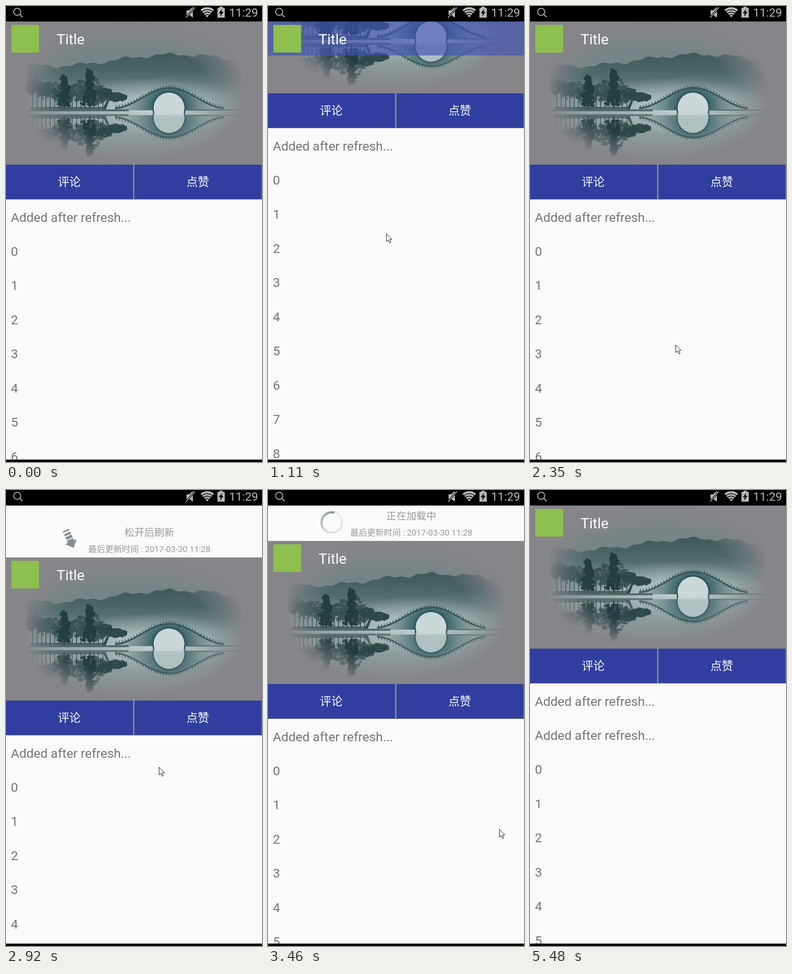
An HTML page with a canvas for the animation above (5.63 s loop, 526 px wide and 940 px high).

```html
<!DOCTYPE html>
<html lang="zh">
<head>
<meta charset="utf-8">
<style>
html, body { margin: 0; width: 526px; height: 940px; overflow: hidden; background: #000; }
canvas { display: block; }
</style>
</head>
<body>
<canvas id="stage" width="526" height="940"></canvas>
<script>
const W = 526, H = 940, LOOP = 5630, BAR = 32, HEADER = 73, PIN = 224;
const GREY = '#868589', PAPER = '#fafafa', INDIGO = '#303f9f', WATERLINE = 220;
const RELEASE = 3200, LOADING = 3400, DONE = 4960;
const FONT = 'Roboto, "Noto Sans CJK SC", "Noto Sans CJK", sans-serif';
const g = document.getElementById('stage').getContext('2d');

const ramp = (t, a, b) => Math.min(1, Math.max(0, (t - a) / (b - a)));
const ease = (t, a, b) => { const u = ramp(t, a, b); return u * u * (3 - 2 * u); };
const easeOut = (t, a, b) => 1 - (1 - ramp(t, a, b)) ** 2;

// Swipe up and back down, then pull to refresh, settle while loading, and close.
const scrollAt = t => 276 * (ease(t, 622, 1560) - ease(t, 1600, 2320));
const dragAt = t => 182 * ramp(t, 2640, 3120);
const pullAt = t => dragAt(t) - (182 - HEADER) * ease(t, RELEASE, 3440) - HEADER * easeOut(t, DONE, 5470);

function pointerAt(t) {
  const drift = ramp(t, 880, 2330), drag = dragAt(t);
  return [
    243 + 56 * drift ** 3 + drag / 7 + 203 * easeOut(t, 3215, 3720),
    614 + 70 * (1 - ease(t, 320, 620)) - scrollAt(t) + 84 * drift ** 2 - 308 * ease(t, 2450, 2640) + 1.7 * drag
  ];
}

function seeded(seed) {
  return () => (seed = (seed * 16807) % 2147483647) / 2147483647;
}

function box(c, color, x, y, w, h) {
  c.fillStyle = color;
  c.fillRect(x, y, w, h);
}

function poly(c, color, pts) {
  c.beginPath();
  pts.forEach(([x, y]) => c.lineTo(x, y));
  c.closePath();
  c.fillStyle = color;
  c.fill();
}

function spread(grad, stops) {
  stops.forEach((s, i) => grad.addColorStop(i / (stops.length - 1), s));
  return grad;
}
const fade = (c, y0, y1, ...stops) => spread(c.createLinearGradient(0, y0, 0, y1), stops);
const glow = (c, x, y, r0, r1, ...stops) => spread(c.createRadialGradient(x, y, r0, x, y, r1), stops);

function text(str, x, y, size, color, align = 'left', weight = 400) {
  g.font = `${weight} ${size}px ${FONT}`;
  g.fillStyle = color;
  g.textAlign = align;
  g.fillText(str, x, y);
}

// Fills the area under the curve y = f(x).
function under(c, color, f, x0, x1, bottom) {
  const pts = [[x0, bottom]];
  for (let x = x0; x <= x1; x += 3) pts.push([x, f(x)]);
  poly(c, color, [...pts, [x1, bottom]]);
}

function foliage(c, rnd, color, x, y, rx, ry, count) {
  c.fillStyle = color;
  for (let i = 0; i < count; i++) {
    const a = rnd() * 7, r = Math.sqrt(rnd());
    c.beginPath();
    c.ellipse(x + Math.cos(a) * r * rx, y + Math.sin(a) * r * ry, 2 + rnd() * 4, 1.5 + rnd() * 2.5, 0, 0, 7);
    c.fill();
  }
}

function conifer(c, rnd, x, top) {
  for (let y = top; y < 205; y += 3) {
    const w = 2 + (y - top) * 0.17 + rnd() * 5;
    foliage(c, rnd, '#243f41', x, y, w, 3, 5);
  }
  box(c, '#243f41', x - 1.5, top, 3, 213 - top);
}

function bridge(c) {
  const deck = x => 167 + 21 * (1 - Math.cos((x - 335) / 115 * Math.PI));
  under(c, glow(c, 335, 210, 32, 115, '#396168', '#6f8a8a', '#8ea4a3', '#7c9292'), deck, 224, 448, 215);
  for (let x = 224; x < 448; x += 2) box(c, '#35565a', x, deck(x), 2, 3.5);
  for (let x = 226; x < 448; x += 6) box(c, '#46666a', x, deck(x) - 4, 2, 5);
  c.beginPath();
  c.arc(335, 210, 33, Math.PI * 0.9, Math.PI * 2.1);
  c.fillStyle = '#cbd8d7';
  c.fill();
  c.strokeStyle = '#2f555c';
  c.lineWidth = 3;
  c.stroke();
}

// Everything standing on the shore; drawn again upside down as the reflection.
function shore(c) {
  const rnd = seeded(41);
  bridge(c);
  for (let x = 54; x < 200; x += 9) {
    const top = 150 + rnd() * 24;
    foliage(c, rnd, 'rgba(56,82,83,.7)', x, top + 14, 10, 18, 32);
    box(c, '#33504f', x, top + 12, 1.8, 200 - top);
  }
  conifer(c, rnd, 120, 146);
  conifer(c, rnd, 172, 134);
  foliage(c, rnd, '#2d494a', 202, 180, 16, 9, 55);
  foliage(c, rnd, '#2d494a', 226, 187, 20, 9, 65);
  poly(c, '#2d494a', [[198, 213], [210, 190], [214, 190], [205, 213]]);
  box(c, 'rgba(60,86,87,.85)', 50, 208, 150, 7);
  box(c, '#506a6a', 44, 213, 208, 4);
  box(c, 'rgba(90,112,112,.8)', 370, 213, 113, 3);
}

function makePhoto() {
  const cv = document.createElement('canvas');
  cv.width = W;
  cv.height = 330;
  const c = cv.getContext('2d');
  const farRidge = x => 112 + 12 * Math.cos((x - 90) / 260 * Math.PI) + 3 * Math.sin(x / 14) + 1.5 * Math.sin(x / 5);
  const nearRidge = x => 150 + 17 * Math.cos((x - 210) / 190 * Math.PI) + 2.5 * Math.sin(x / 11);

  box(c, fade(c, 32, WATERLINE, '#838789', '#768485', '#718787', '#93a8a7'), 0, 0, W, WATERLINE);
  under(c, fade(c, 95, 200, '#3d5859', '#516d6d', 'rgba(125,150,149,0)'), farRidge, 41, 485, 200);
  under(c, fade(c, 130, 190, '#456162', 'rgba(130,152,151,0)'), nearRidge, 205, 485, 190);
  box(c, fade(c, WATERLINE, 320, '#93a5a4', '#8c9a9a', '#868a8c'), 0, WATERLINE - 4, W, 120);
  c.save();
  c.translate(300, 208);
  c.scale(1, 0.32);
  box(c, glow(c, 0, 0, 0, 190, 'rgba(214,227,225,.85)', 'rgba(190,206,204,.45)', 'rgba(180,198,196,0)'), -300, -300, 600, 600);
  c.restore();

  shore(c);
  c.save();
  c.globalAlpha = 0.78;
  c.translate(0, 2 * WATERLINE);
  c.scale(1, -1);
  shore(c);
  c.restore();

  c.globalCompositeOperation = 'destination-in';
  c.save();
  c.translate(262, 180);
  c.scale(236, 150);
  box(c, glow(c, 0, 0, 0.66, 1, '#000', 'rgba(0,0,0,.55)', 'rgba(0,0,0,0)'), -2, -2, 4, 4);
  c.restore();
  c.clearRect(0, 0, 41, 330);
  c.clearRect(483, 0, 43, 330);
  return cv;
}
const photo = makePhoto();

function statusBar() {
  const tint = '#b9b9b9';
  const line = (color, width) => { g.strokeStyle = color; g.lineWidth = width; g.stroke(); };
  box(g, '#000', 0, 0, W, BAR);
  g.beginPath();
  g.arc(23, 12, 7.3, 0, 7);
  g.moveTo(28.5, 17.5);
  g.lineTo(34, 23);
  line(tint, 1.8);

  poly(g, tint, [[371, 9], [376, 9], [384, 2], [384, 24], [376, 18], [371, 18]]);
  g.beginPath();
  g.moveTo(370, 24);
  g.lineTo(388, 3);
  line('#000', 4);
  line(tint, 1.8);

  g.beginPath();
  g.moveTo(413.5, 23.5);
  g.arc(413.5, 23.5, 21, -Math.PI * 0.73, -Math.PI * 0.27);
  g.fillStyle = tint;
  g.fill();
  for (let r = 6; r < 20; r += 5) {
    g.beginPath();
    g.arc(413.5, 23.5, r, -Math.PI * 0.75, -Math.PI * 0.25);
    line('#000', 1.3);
  }

  box(g, tint, 434.5, 4, 15, 20);
  box(g, tint, 438.5, 1.5, 7, 3);
  poly(g, '#000', [[444, 6], [437, 15], [441, 15], [440, 22], [447, 12], [443, 12]]);
  text('11:29', 518, 22, 24, tint, 'right');
}

function arrow(angle) {
  const tint = '#848f91';
  g.rotate(angle);
  for (let i = 0; i < 3; i++) box(g, tint, -7, -20 + i * 6.5, 14, 3 + i * 1.5);
  poly(g, tint, [[-7, 1], [7, 1], [7, 6], [13, 6], [0, 20], [-13, 6], [-7, 6]]);
}

function spinner(t) {
  g.rotate((t - 3460) / 1000 * Math.PI * 2);
  g.strokeStyle = spread(g.createConicGradient(-Math.PI * 0.42, 0, 0), ['#eceeee', '#dce0e1', '#82908f']);
  g.lineWidth = 4.5;
  g.beginPath();
  g.arc(0, 0, 21, 0, 7);
  g.stroke();
}

function refreshHeader(t, pull) {
  const y = BAR + pull - HEADER;
  const label = t < 2895 ? '下拉刷新' : t < LOADING ? '松开后刷新' : t < DONE ? '正在加载中' : '更新完成';
  box(g, fade(g, BAR, BAR + 5, '#e2e2e2', PAPER), 0, BAR, W, 5);
  text(label, 294.5, y + 28.5, 20.5, '#999', 'center');
  text('最后更新时间 : 2017-03-30 11:28', 294.5, y + 61.5, 17.3, '#999', 'center');
  g.save();
  g.translate(131, y + 35);
  if (t < LOADING) arrow(-Math.PI * ramp(t, 2900, 3060));
  else if (t < DONE) spinner(t);
  g.restore();
}

function tab(label, x, y) {
  box(g, INDIGO, x, y + 1, 261, 71);
  text(label, x + 130, y + 45, 23.3, '#fff', 'center', 500);
}

function pointer(t) {
  if (t < 320 || t > 3720) return;
  const [x, y] = pointerAt(t);
  g.save();
  g.translate(Math.round(x) + 0.5, Math.round(y) + 0.5);
  poly(g, '#fff', [[0, 0], [0, 16], [3.6, 12.6], [6.3, 18.6], [8.8, 17.5], [6.3, 11.8], [11, 11.5]]);
  g.strokeStyle = '#111';
  g.lineWidth = 1;
  g.stroke();
  g.restore();
}

function draw(t) {
  const scroll = Math.round(scrollAt(t)), pull = Math.round(pullAt(t));
  const added = t < DONE ? 1 : 2;

  box(g, PAPER, 0, 0, W, H);
  for (let i = 0; i < 15; i++) {
    const label = i < added ? 'Added after refresh...' : String(i - added);
    text(label, 10, Math.floor(445 + 70.45 * i) - scroll + pull, 26.3, '#757575');
  }

  if (pull > 0) refreshHeader(t, pull);
  const shift = pull - Math.min(scroll, PIN);
  g.save();
  g.beginPath();
  g.rect(0, BAR + pull, W, H);
  g.clip();
  box(g, GREY, 0, BAR + shift, W, 399 - BAR);
  g.drawImage(photo, 0, shift);
  g.globalAlpha = Math.min(1, scroll / PIN);
  box(g, '#3f51b5', 0, BAR + pull, W, 70);
  g.globalAlpha = 1;
  box(g, '#8dc04f', 11, 39 + pull, 57, 57);
  text('Title', 104, 79 + pull, 29.6, '#fff');
  tab('评论', 0, 326 + shift);
  tab('点赞', 264, 326 + shift);
  g.restore();

  statusBar();
  pointer(t);
  box(g, '#000', 0, 935, W, 5);
}

const start = performance.now();
function tick() {
  draw((performance.now() - start) % LOOP);
  requestAnimationFrame(tick);
}
tick();
</script>
</body>
</html>
```
